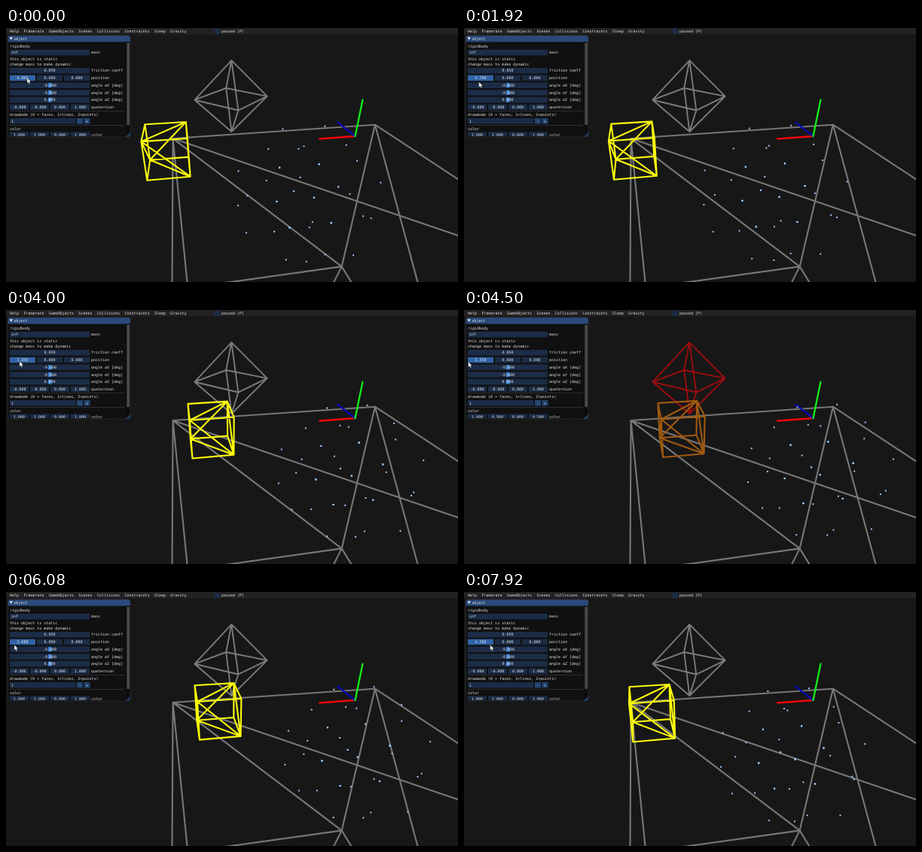
Write an HTML page with a canvas that moves like this. It is 600 px wide and 338 px high and loops after 8 s.

```html
<!DOCTYPE html>
<html lang="en">
<head>
<meta charset="utf-8">
<title>Collision test</title>
<style>
html, body { margin: 0; width: 100%; height: 100%; overflow: hidden; background: #171718; }
canvas { display: block; width: 100vw; height: 100vh; }
</style>
</head>
<body>
<canvas id="stage" width="600" height="338"></canvas>
<script>
const ctx = document.getElementById('stage').getContext('2d');
const LOOP = 8000, STEP = 1000 / 12;
const BACK = '#171718', FIELD = '#1b2c46', ACTIVE = '#3064a6', GRAB = '#3d82d6', INK = '#e4e4e4';

// Dragged position value and cursor height as [time, value]
const POSITION = [[0, 4.9], [1330, 4.93], [1700, 4.9], [2500, 4.16], [3400, 4.16], [4000, 3.85],
  [4500, 3.55], [5250, 3.55], [5800, 3.68], [6080, 3.68], [6450, 3.55], [6700, 3.55],
  [7650, 4.18], [7920, 4.26]];
const CURSOR_Y = [[0, 66.5], [2830, 74.5], [3300, 67.5], [5900, 70.5]];
const REGRAB = [[2900, 0], [3300, 33]];
const TOUCH_BELOW = 3.61;

function track(keys, t) {
  const next = keys.findIndex(key => key[0] >= t);
  if (next < 0) return keys.at(-1)[1];
  if (next === 0) return keys[0][1];
  const [t0, a] = keys[next - 1], [t1, b] = keys[next];
  return a + (b - a) * (t - t0) / (t1 - t0);
}

// ---- 3D scene: x points left, y up, z away from the viewer ----
const FOCAL = 169 / Math.tan(Math.PI / 8);
const PITCH = 0.487, YAW = 0.166;
const ORIGIN = { right: 3.266, down: -0.499, ahead: 8.15 };
const sp = Math.sin(PITCH), cp = Math.cos(PITCH), sy = Math.sin(YAW), cy = Math.cos(YAW);

function project([x, y, z]) {
  const right = ORIGIN.right - cy * x - sy * z;
  const down = ORIGIN.down + sp * sy * x - cp * y - sp * cy * z;
  const ahead = ORIGIN.ahead - cp * sy * x - sp * y + cp * cy * z;
  return [300 + FOCAL * right / ahead, 169 + FOCAL * down / ahead];
}

const add = (a, b) => a.map((v, i) => v + b[i]);
const subtract = (a, b) => a.map((v, i) => v - b[i]);

// Corner index bits select the positive side in x, y and z
const boxCorners = (center, half) => Array.from({ length: 8 }, (_, i) =>
  add(center, [0, 1, 2].map(axis => (i >> axis & 1 ? half : -half))));

const octaCorners = center => [0, 1, 2].flatMap(axis => [1, -1].map(side =>
  center.map((v, i) => (i === axis ? v + side : v))));

function pairs(count, test) {
  const found = [];
  for (let a = 0; a < count; a++)
    for (let b = a + 1; b < count; b++) if (test(a, b)) found.push([a, b]);
  return found;
}

// One diagonal per face joins corners of equal parity
const parity = i => (i ^ i >> 1 ^ i >> 2) & 1;
const boxEdges = flip => pairs(8, (a, b) => {
  const bits = a ^ b;
  if (bits === 7) return false;
  return (bits & bits - 1) === 0 || parity(a) === (bits === 6 ? 0 : flip);
});

const OCTA = octaCorners([3.12, 0.83, 1.22]);
const OCTA_EDGES = pairs(6, (a, b) => a >> 1 !== b >> 1);
const GROUND = boxCorners([0, -7.5, 1.17], 5);
const CUBE_EDGES = boxEdges(0), GROUND_EDGES = boxEdges(1);
const AXES = [[1, 0, 0], [0, 0, 1], [0, 1, 0]];
const AXIS_COLORS = ['#f00808', '#0808b8', '#10f018'];

function wires(corners, edges, color, width) {
  const points = corners.map(project);
  ctx.beginPath();
  for (const [a, b] of edges) {
    ctx.moveTo(...points[a]);
    ctx.lineTo(...points[b]);
  }
  ctx.strokeStyle = color;
  ctx.lineWidth = width;
  ctx.stroke();
}

function scene(value, touching) {
  const cube = boxCorners([value, 0, 0], 0.5);
  wires(GROUND, GROUND_EDGES, '#777', 2.1);
  wires(OCTA, OCTA_EDGES, touching ? '#9c0c0e' : '#7b7b7b', 1.9);
  AXES.forEach((axis, i) => wires([[0, 0, 0], axis], [[0, 1]], AXIS_COLORS[i], 2.3));
  wires(cube, CUBE_EDGES, touching ? '#a0590f' : '#fafa0a', 2.1);
  // Minkowski difference of the two bodies
  for (const a of cube) for (const b of OCTA) {
    const [x, y] = project(subtract(a, b));
    rect(x - 1, y - 1, 2, 2, '#9cc8f4');
  }
}

// ---- Interface ----
function rect(x, y, w, h, color) {
  ctx.fillStyle = color;
  ctx.fillRect(x, y, w, h);
}

function roundRect(x, y, w, h, r) {
  ctx.beginPath();
  ctx.roundRect(x, y, w, h, r);
}

function text(str, x, y, align = 'left') {
  ctx.fillStyle = INK;
  ctx.textAlign = align;
  ctx.fillText(str, x, y + 0.4);
}

function shape(points, fill) {
  ctx.beginPath();
  points.forEach(p => ctx.lineTo(...p));
  ctx.closePath();
  ctx.fillStyle = fill;
  ctx.fill();
}

function fields(y, values, label, activeIndex = -1) {
  const w = (106 - 2 * (values.length - 1)) / values.length;
  values.forEach((value, i) => {
    const x = 5 + i * (w + 2);
    rect(x, y - 3.8, w, 7.6, i === activeIndex ? ACTIVE : FIELD);
    text(value, x + w / 2, y, 'center');
  });
  text(label, 113, y);
}

function slider(y, value, label) {
  rect(5, y - 3.8, 106, 7.6, FIELD);
  rect(56, y - 3, 4.5, 6, GRAB);
  text(value, 58, y, 'center');
  text(label, 113, y);
}

function button(label, x) {
  rect(x, 120, 8, 7.6, '#23446f');
  text(label, x + 4, 124, 'center');
}

function menu() {
  rect(0, 0, 600, 8.5, '#222223');
  let x = 5;
  for (const name of 'Help Framerate GameObjects Scenes Collisions Constraints Sleep Gravity'.split(' ')) {
    text(name, x, 4.4);
    x += ctx.measureText(name).width + 6.4;
  }
  rect(276.5, 1, 7.5, 7, FIELD);
  text('paused (P)', 286, 4.4);
}

function panel(value, touching) {
  ctx.save();
  roundRect(2.5, 10, 162.5, 135, 3);
  ctx.clip();
  rect(2, 10, 164, 135, '#101011');
  rect(2, 10, 164, 8.5, '#294a7a');
  shape([[4.5, 12.3], [9, 12.3], [6.75, 16]], INK);
  text('object', 10.5, 14.2);

  ctx.save();
  ctx.beginPath();
  ctx.rect(2, 18, 157, 125.8);
  ctx.clip();
  text('rigidbody', 5, 24.2);
  rect(5, 28.8, 106, 7.6, FIELD);
  text('inf', 7, 32.7);
  text('mass', 113, 32.7);
  text('this object is static', 5, 41.2);
  text('change mass to make dynamic', 5, 48.2);
  fields(56.8, ['0.050'], 'friction coeff');
  fields(66.5, [value.toFixed(3), '0.000', '0.000'], 'position', 0);
  ['X', 'Y', 'Z'].forEach((axis, i) =>
    slider(76.2 + i * 9.7, i < 2 ? '-0.000' : '0.000', `angle a${axis} [deg]`));
  fields(105.3, ['-0.000', '-0.000', '0.000', '1.000'], 'quaternion');
  rect(5, 110.2, 153, 0.7, '#3a3a44');
  text('drawmode (0 = faces, 1=lines, 2=points)', 5, 115.3);
  rect(5, 120, 87.5, 7.6, FIELD);
  text('1', 7, 124);
  button('-', 94);
  button('+', 103.5);
  rect(5, 129.2, 153, 0.7, '#3a3a44');
  text('color', 5, 134);
  const half = touching ? '0.500' : '1.000';
  fields(142.2, ['1.000', half, '0.000', half], 'color');
  ctx.restore();

  rect(159.5, 18.5, 6, 127, '#0c0c0d');
  roundRect(160.3, 19.3, 3.8, 110, 2);
  ctx.fillStyle = '#4b4b4d';
  ctx.fill();
  shape([[165, 138.5], [165, 145], [158.5, 145]], '#1d3c62');
  ctx.restore();
  roundRect(2.5, 10, 162.5, 135, 3);
  ctx.strokeStyle = '#35353d';
  ctx.lineWidth = 0.6;
  ctx.stroke();
}

function cursor(x, y) {
  const outline = [[0, 0], [0, 7], [1.7, 5.6], [2.9, 8.2], [4.1, 7.6], [3, 5.1], [5.1, 5]];
  shape(outline.map(p => add(p, [x, y])), '#fff');
  ctx.strokeStyle = '#111';
  ctx.lineWidth = 0.4;
  ctx.stroke();
}

function draw(now) {
  const t = Math.floor((now % LOOP) / STEP + 0.001) * STEP;
  const value = Math.round(track(POSITION, t) * 100) / 100;
  const touching = value < TOUCH_BELOW;
  rect(0, 0, 600, 338, BACK);
  ctx.font = '5px "DejaVu Sans Mono", monospace';
  ctx.textBaseline = 'middle';
  ctx.lineCap = 'round';
  scene(value, touching);
  menu();
  panel(value, touching);
  cursor(28 + 41 * (value - 4.9) + track(REGRAB, t), track(CURSOR_Y, t));
}

let origin;
function frame(now) {
  origin ??= now;
  draw(Math.max(0, now - origin));
  requestAnimationFrame(frame);
}
draw(0);
requestAnimationFrame(frame);
</script>
</body>
</html>
```
